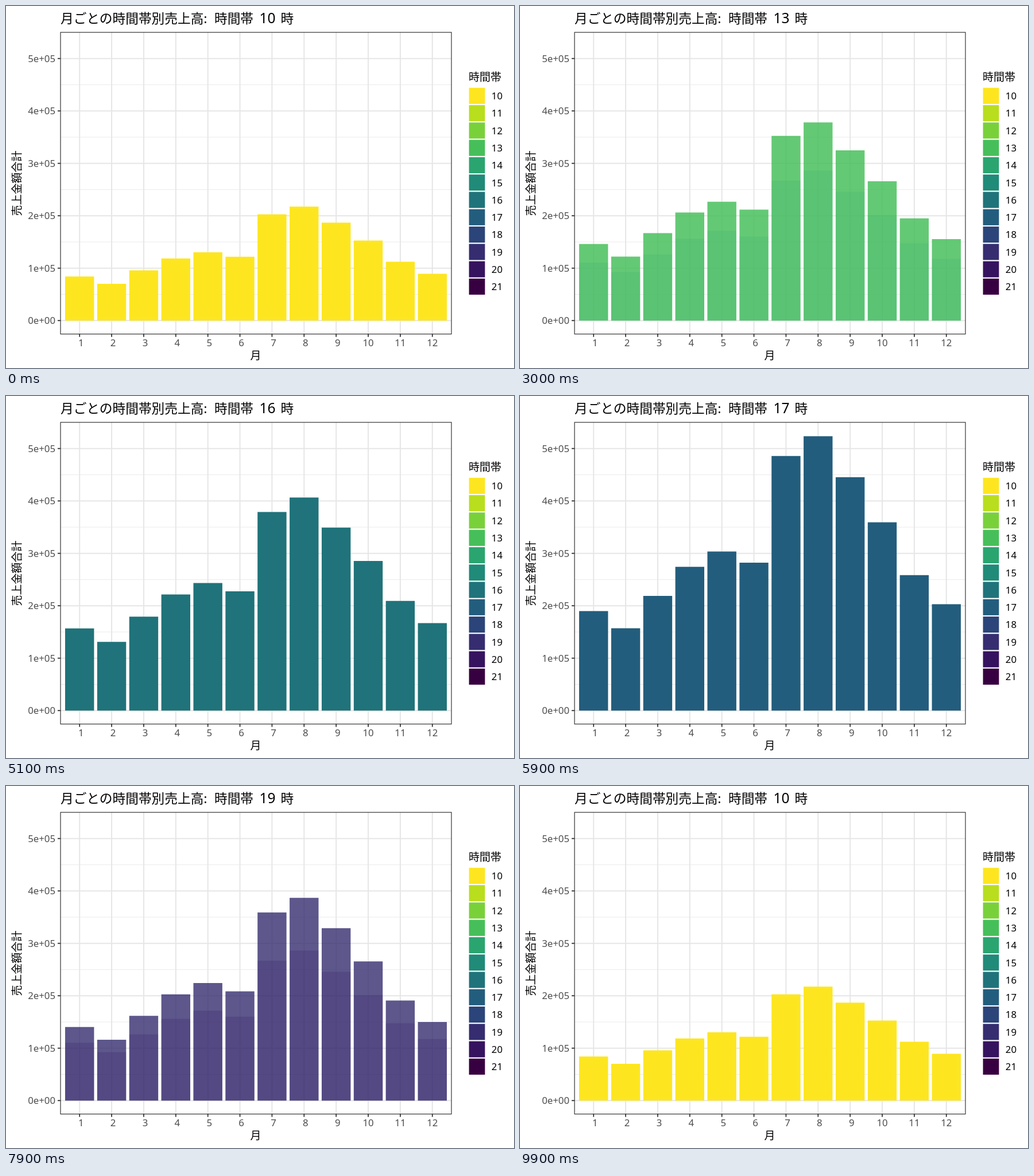
Write an HTML page that moves like this. It is 885 by 632 pixels and loops after 10000 ms.

```html
<!DOCTYPE html>
<html lang="ja">
<head>
<meta charset="utf-8">
<style>
html, body { margin: 0; width: 100%; height: 100%; overflow: hidden; background: #fff; }
svg { display: block; width: 885px; height: 632px; }
text { font-family: "Noto Sans CJK JP", "Noto Sans CJK", sans-serif; font-size: 19px; font-weight: 350; fill: #000; }
.num { font-family: "Noto Sans", sans-serif; font-size: 16.8px; font-weight: 400; }
.axis { fill: #4d4d4d; }
.title { font-size: 22.7px; }
.hour { font-size: 24.5px; }
.mid { text-anchor: middle; }
.end { text-anchor: end; }
</style>
</head>
<body>
<svg id="chart" viewBox="0 0 885 632"></svg>
<script>
const chart = document.getElementById("chart");
const LEFT = 95, RIGHT = 776, TOP = 46, BOTTOM = 572.7;
const BASE = 549.2, UNIT = 91.5, BAR = 50.4;
const FIRST_HOUR = 10, TICK = 100, HOLD = 3;
const monthX = m => 128.2 + 55.87 * m;
const valueY = v => BASE - v * UNIT;

const COLORS = ["#fde620", "#b8de1e", "#79d13a", "#46bf5a", "#2ba570", "#1f8b78",
  "#20737a", "#235d7d", "#2b457a", "#352d70", "#36135f", "#370040"];

// Every hour shares one yearly curve, scaled to that hour's August peak
const SEASON = [.375, .312, .43, .535, .59, .55, .93, 1, .855, .695, .505, .4];
const PEAKS = [199, 261, 359, 346, 262, 317, 372, 479, 431, 354, 262, 193];
// The summer peak is sharper around 18:00
const contrast = hour => 0.97 + 0.22 * Math.exp(-(((hour - 18) / 0.9) ** 2));
const barHeight = (i, m) => PEAKS[i] * SEASON[m] ** contrast(FIRST_HOUR + i);

const FADE_STEPS = [6, 6, 6, 6, 6, 4, 5, 5, 5, 5, 5, 5];
const LOOP = FADE_STEPS.reduce((sum, steps) => sum + steps + HOLD, 0);

function add(tag, attrs, content = "") {
  const el = document.createElementNS("http://www.w3.org/2000/svg", tag);
  for (const key in attrs) el.setAttribute(key, attrs[key]);
  el.textContent = content;
  return chart.appendChild(el);
}
const line = (x1, y1, x2, y2, stroke, width) =>
  add("line", { x1, y1, x2, y2, stroke, "stroke-width": width });
const label = (x, y, cls, content) => add("text", { x, y, class: cls }, content);

for (let v = 0.5; v < 5; v++) line(LEFT, valueY(v), RIGHT, valueY(v), "#ebebeb", 1.1);
for (let v = 0; v <= 5; v++) line(LEFT, valueY(v), RIGHT, valueY(v), "#e6e6e6", 2);
for (let m = 0; m < 12; m++) line(monthX(m), TOP, monthX(m), BOTTOM, "#e6e6e6", 2);

const outgoing = add("path", {}), incoming = add("path", {});

add("rect", { x: LEFT, y: TOP, width: RIGHT - LEFT, height: BOTTOM - TOP,
  fill: "none", stroke: "#333", "stroke-width": 1.2 });
for (let v = 0; v <= 5; v++) {
  line(LEFT - 5, valueY(v), LEFT, valueY(v), "#333", 1.8);
  label(86, valueY(v) + 6, "num axis end", `${v}e+0${v ? 5 : 0}`);
}
for (let m = 0; m < 12; m++) {
  line(monthX(m), BOTTOM, monthX(m), BOTTOM + 5, "#333", 1.8);
  label(monthX(m) + (m < 9 ? 2.6 : 0), 593.7, "num axis mid", m + 1);
}
label(435, 617.3, "mid", "月");
add("text", { transform: "translate(26 309.5) rotate(-90)", class: "mid" }, "売上金額合計");

label(806, 130.5, "", "時間帯");
COLORS.forEach((fill, i) => {
  const y = 142.8 + 30.28 * i;
  add("rect", { x: 806.6, y, width: 27.8, height: 28.1, fill });
  label(845.8, y + 20.4, "num", FIRST_HOUR + i);
});

label(95, 29.5, "title", "月ごとの時間帯別売上高:");
label(363, 29.5, "title", "時間帯");
const hourLabel = label(455.5, 29.5, "num hour mid", "");
label(478.5, 29.5, "title", "時");

const barPaths = PEAKS.map((_, i) => SEASON.map((_, m) => {
  const h = barHeight(i, m);
  return `M${monthX(m) - BAR / 2} ${BASE}v${-h}h${BAR}v${h}z`;
}).join(""));

function setBars(el, i, opacity) {
  el.setAttribute("d", barPaths[i]);
  el.setAttribute("fill", COLORS[i]);
  el.setAttribute("fill-opacity", opacity);
}

// Each hour rests for HOLD ticks, then cross-fades into the next
function draw(now) {
  let tick = Math.floor(now / TICK) % (LOOP + 1);
  let from = 0;
  while (from < 11 && tick >= HOLD + FADE_STEPS[from]) tick -= HOLD + FADE_STEPS[from++];
  const to = (from + 1) % 12;
  const p = Math.min(1, Math.max(0, (tick - HOLD + 1) / FADE_STEPS[from]));
  setBars(outgoing, from, 1 - p);
  setBars(incoming, to, p);
  hourLabel.textContent = FIRST_HOUR + (p >= 0.5 ? to : from);
}

let origin;
function loop(now) {
  origin ??= now;
  draw(now - origin);
  requestAnimationFrame(loop);
}
draw(0);
requestAnimationFrame(loop);
</script>
</body>
</html>
```
